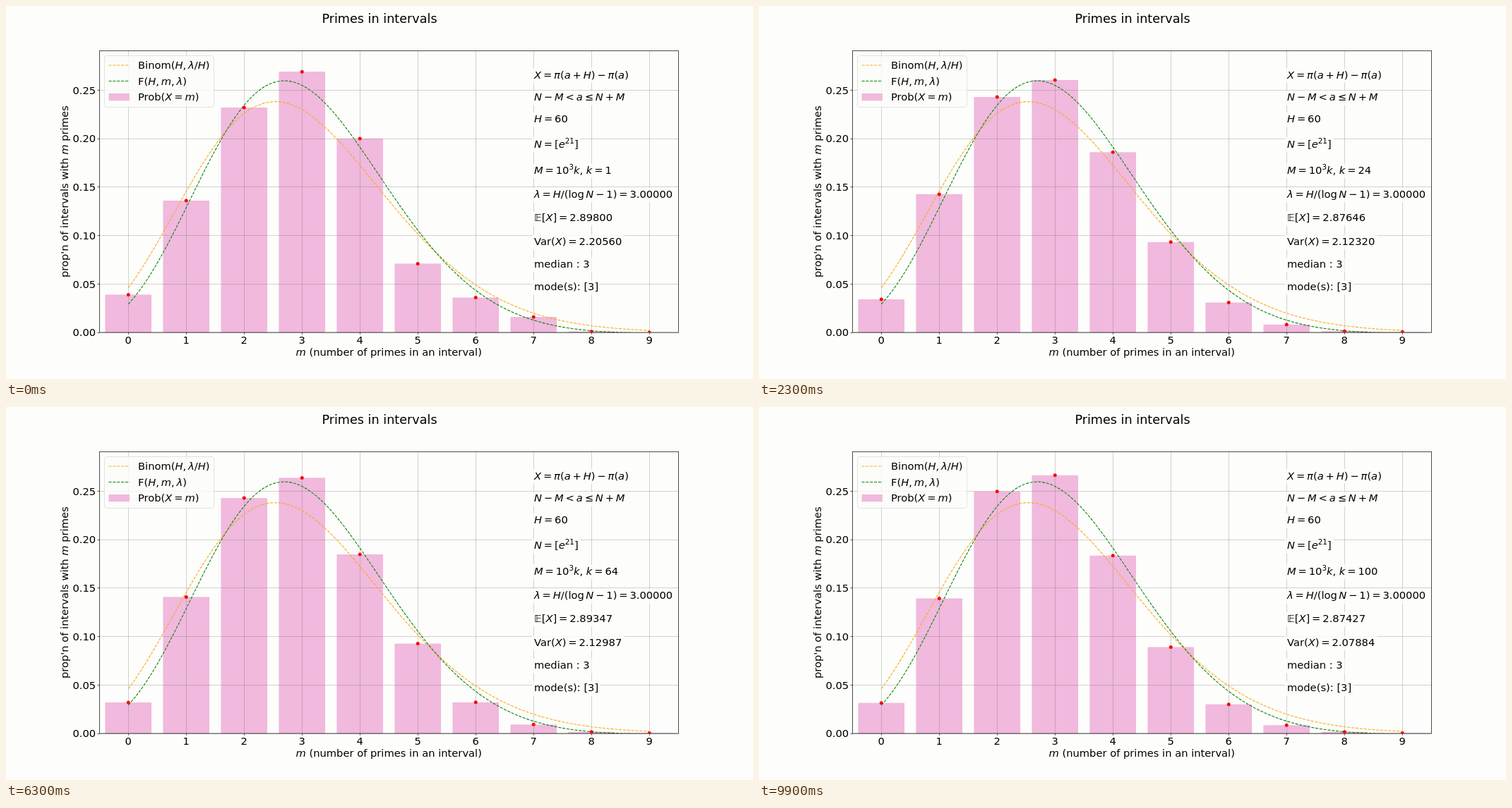
Animation of 1058 by 529 pixels, one loop 10 s. Source, as an HTML page:

```html
<!DOCTYPE html>
<html lang="en">
<head>
<meta charset="utf-8">
<title>Primes in intervals</title>
<style>
  html, body { margin: 0; width: 100%; height: 100%; overflow: hidden; background: #fdfdfb; }
  svg { display: block; width: 100vw; height: 100vh; }
  text { font: 14.69px "DejaVu Sans", sans-serif; white-space: pre; }
  .it { font-style: italic; }
  .sup { font-size: 10.3px; }
  .grid { stroke: rgba(115, 115, 120, .32); }
  .axis { stroke: rgba(0, 0, 0, .7); fill: none; }
  .bar { fill: #f0b9dd; }
  .curve { fill: none; stroke-width: 1.1; stroke-dasharray: 4.08 1.76; }
  .binom { stroke: #f9a91c; }
  .refined { stroke: #0a840a; }
  .dot { fill: #f80808; }
</style>
</head>
<body>
<svg id="stage" viewBox="0 0 1058 529"></svg>
<script>
const STEP = 100, STEPS = 100;
const H = 60, N = Math.floor(Math.exp(21)), M = 1000, LAMBDA = 3, BINS = 10;
const LEFT = 132.25, RIGHT = 952.2, TOP = 63.5, BASE = 463, UNIT = 82, SCALE = 1375;
const px = m => LEFT + (m + 0.5) * UNIT;
const py = p => BASE - p * SCALE;
const snap = v => Math.floor(v) + 0.5;
const stage = document.getElementById('stage');

function add(tag, attrs, parent = stage) {
  const el = document.createElementNS('http://www.w3.org/2000/svg', tag);
  for (const key in attrs) el.setAttribute(key, attrs[key]);
  parent.append(el);
  return el;
}

const line = (x1, y1, x2, y2, cls) => add('line', { x1, y1, x2, y2, class: cls });

// Markup: _italic_, ^{superscript}, ~ thin gap around an operator, ' small gap with |.
function setMath(el, markup) {
  el.textContent = '';
  let gap = 0, raised = false;
  for (const part of markup.match(/_[^_]+_|\^\{[^}]+\}|~|\||[^_^~|]+/g)) {
    if (part === '~') { gap += 2.86; continue; }
    if (part === '|') { gap += 2.4; continue; }
    const sup = part[0] === '^', it = part[0] === '_';
    const span = add('tspan', { dx: gap, dy: sup ? -5.6 : raised ? 5.6 : 0 }, el);
    if (sup) span.setAttribute('class', 'sup');
    if (it) span.setAttribute('class', 'it');
    span.textContent = sup ? part.slice(2, -1) : it ? part.slice(1, -1) : part;
    gap = 0;
    raised = sup;
  }
}

function label(markup, x, y, attrs = {}) {
  const el = add('text', { x, y, ...attrs });
  setMath(el, markup);
  return el;
}

// Distribution of the number of primes in (a, a + H] for N - kM < a <= N + kM.
function primeStats() {
  const start = N - STEPS * M, size = 2 * STEPS * M + H + 1;
  const composite = new Uint8Array(size);
  const root = Math.ceil(Math.sqrt(start + size));
  const small = new Uint8Array(root + 1);
  for (let p = 2; p <= root; p++) {
    if (small[p]) continue;
    for (let j = p * p; j <= root; j += p) small[j] = 1;
    for (let j = (p - start % p) % p; j < size; j += p) composite[j] = 1;
  }
  const pi = new Uint32Array(size);
  for (let i = 1; i < size; i++) pi[i] = pi[i - 1] + 1 - composite[i];

  const counts = new Array(40).fill(0), stats = [];
  const mid = STEPS * M;
  const tally = (from, to) => {
    for (let i = from + 1; i <= to; i++) counts[pi[i + H] - pi[i]]++;
  };
  for (let k = 1; k <= STEPS; k++) {
    tally(mid - k * M, mid - (k - 1) * M);
    tally(mid + (k - 1) * M, mid + k * M);
    const probs = counts.map(c => c / (2 * k * M));
    const mean = probs.reduce((s, p, m) => s + p * m, 0);
    const variance = probs.reduce((s, p, m) => s + p * (m - mean) ** 2, 0);
    stats.push({ probs, mean, variance });
  }
  return stats;
}

function logGamma(x) {
  let shift = 0;
  while (x < 10) shift += Math.log(x++);
  return (x - 0.5) * Math.log(x) - x + Math.log(2 * Math.PI) / 2
    + 1 / (12 * x) - 1 / (360 * x ** 3) - shift;
}

function binomial(m) {
  const p = LAMBDA / H;
  return Math.exp(logGamma(H + 1) - logGamma(m + 1) - logGamma(H - m + 1)
    + m * Math.log(p) + (H - m) * Math.log(1 - p));
}

function refined(m) {
  const poisson = Math.exp(m * Math.log(LAMBDA) - LAMBDA - logGamma(m + 1));
  const c = (Math.log(2 * Math.PI * H) + 0.5772157 - 1) / H;
  return poisson * (1 - c * ((m - LAMBDA) ** 2 - m) / 2);
}

function curve(f, cls) {
  let d = '';
  for (let i = 0; i <= 180; i++) {
    d += (i ? 'L' : 'M') + px(i / 20).toFixed(2) + ' ' + py(f(i / 20)).toFixed(2);
  }
  add('path', { d, class: 'curve ' + cls, 'clip-path': 'url(#plot)' });
}

function noteBox(el) {
  const { x, width } = el.getBBox(), y = +el.getAttribute('y');
  const box = add('rect', { x: x - 3, y: y - 14.5, width: width + 6, height: 21,
    fill: '#fdfdfb', 'fill-opacity': 0.85 });
  stage.insertBefore(box, el);
}

const clip = add('clipPath', { id: 'plot' }, add('defs', {}));
add('rect', { x: LEFT, y: TOP, width: RIGHT - LEFT, height: BASE - TOP }, clip);
add('rect', { width: 1058, height: 529, fill: '#fdfdfb' });

const bars = Array.from({ length: BINS }, (_, m) =>
  add('rect', { x: px(m - 0.4), width: 0.8 * UNIT, class: 'bar' }));

for (let m = 0; m < BINS; m++) {
  const x = snap(px(m));
  line(x, TOP, x, BASE, 'grid');
  line(x, BASE, x, BASE + 2.6, 'axis');
  label(String(m), px(m), 478.7, { 'text-anchor': 'middle' });
}
for (let i = 0; i < 6; i++) {
  const y = snap(py(i / 20));
  line(LEFT, y, RIGHT, y, 'grid');
  line(LEFT - 2.6, y, LEFT, y, 'axis');
  label((i / 20).toFixed(2), 127.1, py(i / 20) + 5.4, { 'text-anchor': 'end' });
}

curve(binomial, 'binom');
curve(refined, 'refined');
add('rect', { x: 132.5, y: 63.5, width: 820, height: 399.5, class: 'axis' });

const dotLayer = add('g', { 'clip-path': 'url(#plot)' });
const dots = Array.from({ length: BINS }, (_, m) =>
  add('circle', { cx: px(m), r: 2.5, class: 'dot' }, dotLayer));

label('Primes in intervals', 529, 24, { 'text-anchor': 'middle', style: 'font-size:17.63px' });
label('_m_ (number of primes in an interval)', 542.2, 495.6, { 'text-anchor': 'middle' });
label("prop'n of intervals with _m_ primes", 0, 0,
  { 'text-anchor': 'middle', transform: 'translate(88 263.2) rotate(-90)' });

add('rect', { x: 139.5, y: 70.5, width: 155, height: 73, rx: 3,
  fill: '#fdfdfb', 'fill-opacity': 0.8, stroke: '#dcdcdc', 'stroke-opacity': 0.8 });
line(145.5, 84, 175, 84, 'curve binom');
line(145.5, 106.5, 175, 106.5, 'curve refined');
add('rect', { x: 145.5, y: 124, width: 29.4, height: 10.3, class: 'bar' });
label('Binom(_H_,~_λ_/_H_)', 187, 89);
label('F(_H_,~_m_,~_λ_)', 187, 111.7);
label('Prob(_X_~=~_m_)', 187, 134.4);

const note = (markup, y) => {
  const el = label(markup, 748, y);
  noteBox(el);
  return el;
};
const scaleText = k => `_M_~=~10^{3}_k_, _k_~=~${k}`;
const meanText = v => `𝔼[_X_]~=~${v.toFixed(5)}`;
const varText = v => `Var(_X_)~=~${v.toFixed(5)}`;

note('_X_~=~_π_(_a_~+~_H_)~−~_π_(_a_)', 102.5);
note('_N_~−~_M_~<~_a_~≤~_N_~+~_M_', 134.4);
note('_H_~=~60', 165.3);
note('_N_~=~[_e_^{21}]', 201);
const scaleNote = note(scaleText(1), 237.8);
note('_λ_~=~_H_/(log|_N_~−~1)~=~3.00000', 272.2);
const meanNote = note(meanText(0), 305.4);
const varNote = note(varText(0), 339);
note('median : 3', 371.2);
note('mode(s): [3]', 403.2);

const stats = primeStats();
let shown = 0;

function show(k) {
  const { probs, mean, variance } = stats[k - 1];
  for (let m = 0; m < BINS; m++) {
    bars[m].setAttribute('y', py(probs[m]));
    bars[m].setAttribute('height', probs[m] * SCALE);
    dots[m].setAttribute('cy', py(probs[m]));
  }
  setMath(scaleNote, scaleText(k));
  setMath(meanNote, meanText(mean));
  setMath(varNote, varText(variance));
  shown = k;
}

let origin;
function tick(now) {
  origin ??= now;
  const k = Math.floor((now - origin) / STEP) % STEPS + 1;
  if (k !== shown) show(k);
  requestAnimationFrame(tick);
}
show(1);
requestAnimationFrame(tick);
</script>
</body>
</html>
```
